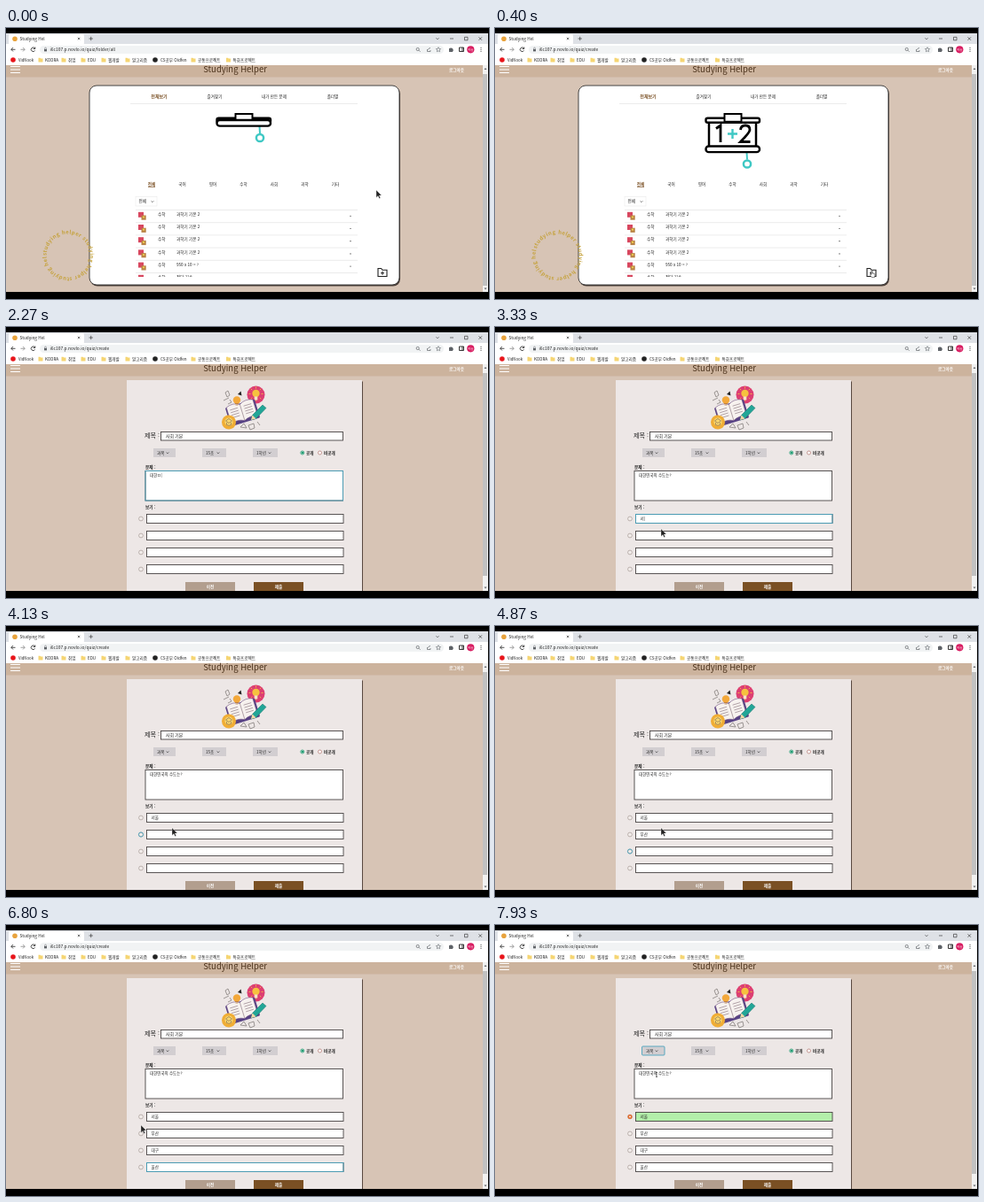
These frames come from a looping animation (544 by 306 pixels, 8000 ms). An HTML page:

```html
<!DOCTYPE html>
<html lang="ko">
<head>
<meta charset="utf-8">
<style>
html, body { margin: 0; width: 100%; height: 100%; overflow: hidden; background: #000; }
svg { display: block; width: 544px; height: 306px; font-family: "Noto Sans CJK KR", "Noto Sans CJK", "Noto Sans", sans-serif; }
</style>
</head>
<body>
<svg id="stage" viewBox="0 0 544 306"></svg>
<script>
const LOOP = 8000, PAGE_SWITCH = 470;
const INK = '#222', BROWN = '#7a5024', TEAL = '#3fc8c4', GRAY = '#5f6368';
const APP = 'Studying Helper', HOST = 'i6c107.p.novlo.io/quiz/';

const rect = (x, y, w, h, fill, extra = '') =>
  `<rect x="${x}" y="${y}" width="${w}" height="${h}" fill="${fill}" ${extra}/>`;
const circle = (x, y, r, fill, extra = '') =>
  `<circle cx="${x}" cy="${y}" r="${r}" fill="${fill}" ${extra}/>`;
const path = (d, stroke = INK, width = .8, fill = 'none', extra = '') =>
  `<path d="${d}" stroke="${stroke}" stroke-width="${width}" fill="${fill}" ${extra}/>`;
const text = (x, y, s, size = 4.6, fill = INK, extra = '') =>
  `<text x="${x}" y="${y}" font-size="${size}" fill="${fill}" ${extra}>${s}</text>`;
const MID = ' text-anchor="middle"', BOLD = ' font-weight="700"', MEDIUM = ' font-weight="500"';
const chevron = (x, y) => path(`M${x - 1.4} ${y - .7}l1.4 1.4 1.4-1.4`, INK, .6);
const field = ([x, y, w, h], extra = '') => rect(x, y, w, h, '#fff', `stroke="#484444" stroke-width=".9" ${extra}`);

function browser() {
  const folder = (x, label) =>
    path(`M${x - 2.5} 33.8h2l.8.7h2.2v4h-5z`, 'none', 0, '#f5d573') + text(x + 5, 37.7, label);
  return rect(0, 6, 543, 12, '#dee1e6') + rect(3, 7, 85, 12, '#fff', 'rx="2"') +
    circle(10, 12.3, 2.8, '#e8a33d') + text(15.5, 13.8, APP.slice(0, 12), 4.7) +
    path('M80.8 10.8l2.4 2.4m0-2.4l-2.4 2.4M93.5 12h4.4m-2.2-2.2v4.4M484.5 11.3l1.5 1.5 1.5-1.5M500 12h4M516.5 10.3h3.5v3.5h-3.5zM532.5 10.3l3.5 3.5m0-3.5l-3.5 3.5', INK, .6) +
    rect(0, 18, 543, 24, '#fff') + rect(38, 20, 455, 9, '#f1f3f4', 'rx="4.5"') +
    path('M10.5 24.3H6m2-2.2l-2.2 2.2L8 26.5M32.5 23a2.3 2.3 0 1 0 .1 2.4M32.8 21.5v2h-2', INK, .8) +
    path('M16.5 24.3H21m-2-2.2l2.2 2.2L19 26.5', '#888', .8) +
    rect(43, 24, 3, 2.4, GRAY) + path('M43.6 24v-1a.9.9 0 0 1 1.8 0v1', GRAY, .5) +
    `<text id="url" x="49.5" y="26.3" font-size="4.9" fill="${INK}"></text>` +
    circle(463.7, 24, 1.6, 'none', `stroke="${GRAY}" stroke-width=".7"`) +
    path('M465 25.2l1.6 1.6M474.5 24v2.5h3.5V25m-2.5-.5q.5-2 2.5-2', GRAY, .7) +
    path('M487 21.7l.8 1.7 1.8.2-1.3 1.3.3 1.8-1.6-.9-1.6.9.3-1.8-1.3-1.3 1.8-.2z', GRAY, .6) +
    path('M499 23h1.3a.8.8 0 0 1 1.6 0h1.3v1.3a.8.8 0 0 1 0 1.6V27H499z', 'none', 0, GRAY) +
    path('M510.5 22h5v4.5h-5zM514 22v4.5', INK, .9) +
    circle(523.3, 24.3, 4.1, '#d81b60') + text(523.3, 25.6, '하늘', 3.4, '#fff', MID) +
    [22.3, 24.3, 26.3].map(y => circle(535, y, .55, INK)).join('') +
    circle(8, 36, 2.8, '#e8151b') + text(14, 37.7, 'VidNook', 4.3) +
    folder(39, 'KODRA') + folder(65, '취업') + folder(87, 'EDU') + folder(110, '웹개발') + folder(137, '알고리즘') +
    circle(168, 36, 2.8, INK) + text(174, 37.7, 'CS공부 Oldfen') +
    folder(211, '공통프로젝트') + folder(250.5, '특화프로젝트') +
    rect(0, 42, 537, 256, '#d7c4b5') + rect(0, 42, 537, 13.5, '#ccb39d') +
    path('M5 43.5h11M5 47h11M5 50.5h11', '#fff', 1.1) +
    text(258, 50.3, APP, 9.5, '#4d341d', MID + MEDIUM) +
    text(507.5, 49, '로그아웃', 4.6, '#fff', MID + BOLD) +
    rect(537, 42, 6, 256, '#f1f1f1') + '<rect id="thumb" x="537" y="52" width="5" fill="#c1c1c1"/>' +
    path('M538.5 47l1.5-2 1.5 2z', 'none', 0, GRAY) + path('M538.5 293.5l1.5 2 1.5-2z', 'none', 0, GRAY);
}

function listPage() {
  const tabs = [[172.5, '전체보기'], [235, '즐겨찾기'], [302, '내가 만든 문제'], [368, '폴더별']];
  const subjects = ['전체', '국어', '영어', '수학', '사회', '과학', '기타'];
  const titles = ['과학기 기본 2', '과학기 기본 2', '과학기 기본 2', '과학기 기본 2', '950 x 10 = ?', '정답 지수'];
  const style = i => MID + (i ? MEDIUM : BOLD);
  const rows = titles.map((s, i) => {
    const y = 205.5 + i * 14.2;
    return path(`M146 ${y}h250`, '#ddd', .6) + rect(149, y + 2.3, 6, 6, '#d8475f') +
      rect(152.5, y + 6, 5.2, 5.2, '#b98345') + circle(155, y + 8, 1.1, '#f0d04c') +
      text(171, y + 6.4, '수학', 4.7, INK, MEDIUM) + text(192, y + 6.4, s, 4.6, INK, MEDIUM) +
      circle(388, y + 6.8, .6, INK);
  }).join('');
  return rect(95, 66.5, 349, 225, '#4d4039', 'rx="8"') +
    rect(94, 65, 349, 225, '#fff', 'rx="8" stroke="#333" stroke-width=".9"') +
    tabs.map(([x, s], i) => text(x, 78.7, s, i ? 4.6 : 5, i ? INK : BROWN, style(i))).join('') +
    path('M140 85.5h256', '#ddd', .6) +
    '<clipPath id="sheet"><rect id="sheetArea" x="236" y="105" width="63"/></clipPath>' +
    `<g clip-path="url(#sheet)">${path('M241 104v32M294 104v32', '#000', 2.5)}
      ${path('M249 113.5l5-3.5v19M276.500 115q.5-5 5.500-5t5 5q0 3-10.500 13.500h11', '#000', 2.8)}
      ${path('M262 119.5h11m-5.5-5.5v11', TEAL, 2.4)}</g>` +
    rect(237.5, 101.8, 60.5, 5, '#fff', 'rx="2" stroke="#000" stroke-width="2.4"') +
    rect(258.5, 97, 19, 8.8, '#fff', 'stroke="#000" stroke-width="2"') +
    `<g id="pull"><g id="cord">${path('M285.5 111l.5 8', TEAL, 2)}
      ${circle(286, 124, 4.1, '#fff', `stroke="${TEAL}" stroke-width="2.5"`)}</g>
      ${rect(237.5, 104, 60.5, 6.6, '#fff', 'rx="3.2" stroke="#000" stroke-width="2.4"')}</g>` +
    subjects.map((s, i) => text(164 + i * 34.5, 177.7, s, 4.6, i ? INK : BROWN, style(i))).join('') +
    path('M160 179.5h8', BROWN, .7) +
    rect(146, 190.5, 24, 10.5, '#fff', 'stroke="#e5e5e5" stroke-width=".5"') +
    text(149.5, 197.4, '전체', 4.6, INK, MEDIUM) + chevron(165, 196) +
    `<clipPath id="list"><rect x="140" y="203" width="260" height="78"/></clipPath><g clip-path="url(#list)">${rows}</g>` +
    path('M419 271.5h3.5l1.5 1.7h5v7.3h-10zM424 274.8v4m-2-2h4', INK, 1.1) +
    `<g id="ring"><path id="orbit" d="M45.500 257a24.500 24.500 0 1 1 49 0a24.500 24.500 0 1 1-49 0" fill="none"/>
      <text font-size="6" letter-spacing=".42" font-weight="700" fill="#c5a23c"><textPath href="#orbit">${(APP.toLowerCase() + ' ').repeat(3)}</textPath></text></g>`;
}

const titleBox = [174.5, 118.5, 205, 9.5, 0];
const questionBox = [157, 162.5, 222.5, 33.5, 0];
const optionY = [211.5, 230.5, 249.5, 268.5];
const inputBox = i => [158.5, optionY[i], 221.5, 10, 0];
const radioBox = i => [149.4, optionY[i] + 2.4, 5.2, 5.2, 2.6];

function illustration() {
  const rays = [0, 45, 90, 135, 180, 225, 270, 315].map(a =>
    path('M281.500 67.500v2', '#f6c23f', .8, 'none', `transform="rotate(${a} 281.5 75.5)"`)).join('');
  return circle(281.5, 76.5, 10, '#dd3f72') + rays + circle(281.5, 75, 4.2, '#f6c23f') + rect(279.7, 78.500, 3.6, 4, '#f4e3c8') +
    `<g transform="rotate(-17 266 96)">${rect(249, 86, 34.5, 22, '#574284', 'rx="1.5"')}
      ${path('M250.500 86q8-3.500 15.500 1 7.500-4.500 15.500-1v19q-8-3-15.500 1-7.500-4-15.500-1z', '#6b4a7e', .5, '#f7f2ef')}
      ${path('M266 87v18.500M253.500 90h9m-9 3h9m-9 3h9m-9 3h9M269.500 90h9m-9 3h9m-9 3h9m-9 3h9', '#8a7680', .6)}</g>` +
    path('M276 105l1.500-5.500 11.500-11.500 4 3.500-11.500 12z', '#166e69', .5, '#22a697') +
    path('M276 105l1.500-5.500 4 4z', 'none', 0, '#f3d6a5') +
    circle(251, 107.5, 8, '#f0ad35') + circle(251, 107, 4.6, '#f8d76e') +
    path('M247.500 106l3.500-2.500 3.500 2.500-3.500 2.500zM248.500 108v2.500q2.500 1.500 5 0V108', '#8a6d52', .7) +
    circle(260, 82.5, 4.2, '#f3a83a') + path('M258 86.500h4m-3.500 1.500h3', '#b7702b', .7) +
    path('M261 76l3.500-3.500 1 5z', 'none', 0, INK) +
    path('M247 74l3-2 2 5-3 2zM245 83l6-3M252 82l2 3-4 2M264 113l4-4 3 5zM273 111l6-2 1 5-5 2zM283 107l3 4', '#77716f', .7);
}

function formPage() {
  const select = (x, w, s) => rect(x, 137, w, 10, '#d2ced1') + text(x + 4, 143.7, s, 4.5, INK, MEDIUM) + chevron(x + w - 9, 142.2);
  const button = (x, fill, s) => rect(x, 288, 56, 10, fill) + text(x + 28, 294.6, s, 4.6, '#fff', MID + BOLD);
  const option = (y, i) => circle(152, y + 5, 2.4, '#f1ecea', 'stroke="#9a8e89" stroke-width=".6"') +
    field(inputBox(i), `id="option${i}"`);
  return rect(138, 61.5, 264, 236.5, '#59483f') + rect(136, 60, 265, 238, '#ede7e6') + illustration() +
    text(156, 125.2, '제목 :', 7.1, INK, MEDIUM) + field(titleBox) +
    select(166, 25, '과목') + select(221, 27, '15초') + select(278, 28, '1학년') +
    circle(333.8, 142, 2, '#fff', 'stroke="#16966b" stroke-width=".8"') + circle(333.8, 142, 1.2, '#16966b') +
    text(338, 143.7, '공개', 4.6, INK, BOLD) +
    circle(353.5, 142, 2, '#fff', 'stroke="#a55d55" stroke-width=".6"') + text(358, 143.7, '비공개', 4.6, INK, BOLD) +
    text(157, 160.2, '문제 :', 4.7, INK, BOLD) + field(questionBox) +
    text(157, 205.2, '보기 :', 4.6, INK, BOLD) + optionY.map(option).join('') +
    `<g id="picked">${circle(152, 216.4, 2.5, '#e36b2c')}${circle(152, 216.4, .9, '#fff')}</g>` +
    button(202, '#b29e8e', '이전') + button(279, BROWN, '제출') +
    '<rect id="focus" fill="none" stroke="#4aa3bd" stroke-width=".9"/>' +
    entries.map((e, i) => text(e.x, e.y, '', e.size, INK, `id="entry${i}"` + MEDIUM)).join('');
}

// Each Hangul syllable appears jamo by jamo, as an input method composes it.
function compose(s) {
  const initials = 'ㄱㄲㄴㄷㄸㄹㅁㅂㅃㅅㅆㅇㅈㅉㅊㅋㅌㅍㅎ', stages = [];
  let done = '';
  for (const c of s) {
    const n = c.charCodeAt(0) - 0xAC00;
    if (n >= 0) {
      stages.push(done + initials[Math.floor(n / 588)]);
      if (n % 28) stages.push(done + String.fromCharCode(0xAC00 + n - n % 28));
    }
    stages.push(done += c);
  }
  return stages;
}

const entry = (x, y, size, s, start, end) => ({ x, y, size, start, end, stages: compose(s) });
const entries = [
  entry(180, 124.9, 4.9, '사회 기본', 1270, 1950),
  entry(162, 169.4, 4.5, '대한민국의 수도는?', 2070, 2850),
  ...[['서울', 3130, 3900], ['부산', 4230, 4720], ['대구', 5130, 5600], ['울산', 5930, 6500]]
    .map(([s, start, end], i) => entry(163.5, optionY[i] + 6.7, 4.6, s, start, end))
];

const focusSteps = [
  [0, null], [1130, titleBox], [2000, questionBox], [2850, inputBox(0)],
  [4000, radioBox(1)], [4150, inputBox(1)], [4800, radioBox(2)], [5000, inputBox(2)],
  [5650, radioBox(3)], [5800, inputBox(3)], [7070, null], [7670, [165.5, 137, 25.5, 10, 1]]
];
const moves = [
  [0, 417, 183], [70, 417, 183], [330, 424, 274], [520, 424, 274], [960, 250, 123], [2300, 205, 180],
  [2600, 190, 185], [2870, 187, 228], [6500, 187, 228], [6800, 152, 226], [6930, 152, 226], [7050, 152, 215],
  [7250, 152, 215], [7600, 176, 142], [7700, 176, 142], [7900, 182, 169]
];
const shapes = [[0, 'arrow'], [300, 'hand'], [520, 'arrow'], [950, 'hidden'], [2650, 'arrow'], [7780, 'beam']];

const $ = id => document.getElementById(id);
const set = (id, attrs) => { for (const k in attrs) $(id).setAttribute(k, attrs[k]); };
const show = (id, on) => set(id, { display: on ? 'inline' : 'none' });
const clamp = v => Math.max(0, Math.min(1, v));
const ease = v => { v = clamp(v); return v * v * (3 - 2 * v); };
const current = (steps, t) => steps.filter(s => s[0] <= t).pop()[1];

function pointerAt(t) {
  const i = moves.findIndex(m => m[0] > t);
  if (i < 0) return moves[moves.length - 1].slice(1);
  const [a, b] = [moves[i - 1], moves[i]], k = ease((t - a[0]) / (b[0] - a[0]));
  return [a[1] + (b[1] - a[1]) * k, a[2] + (b[2] - a[2]) * k];
}

$('stage').innerHTML = browser() + `<g id="list-page">${listPage()}</g><g id="form-page">${formPage()}</g>` +
  `<g id="pointer">${path('M0 0v8.400l2-1.800 1.400 3 1.300-.6-1.400-2.900h2.700z', '#fff', .3, INK, 'id="arrow"')}
    ${path('M0 0v4.500l-1-.6q-1 .3-.4 1.200l1.600 2.400h3.300l.7-3.600-2.900-.8V0Q.7-.8 0 0z', INK, .5, '#fff', 'id="hand"')}
    ${path('M-1-2.500h2M0-2.500v5M-1 2.500h2', INK, .6, 'none', 'id="beam"')}</g>` +
  rect(0, 298, 544, 8, '#000');

function draw(t) {
  const onForm = t >= PAGE_SWITCH;
  show('list-page', !onForm);
  show('form-page', onForm);
  set('thumb', { height: onForm ? 229 : 239 });
  $('url').textContent = HOST + (t < 380 ? 'folder/all' : 'create');

  const open = ease(t / 380), drop = 29.5 * open;
  set('pull', { transform: `translate(0 ${drop})` });
  set('cord', { transform: `translate(${-2 * open} 0)` });
  set('sheetArea', { height: drop + 1 });
  set('ring', { transform: `rotate(${t * .045} 70 257)` });

  entries.forEach((e, i) => {
    const n = e.stages.length, k = Math.floor((t - e.start) / (e.end - e.start) * (n - 1));
    const caret = t >= e.start && t < e.end ? '|' : '';
    $('entry' + i).textContent = k < 0 ? '' : e.stages[Math.min(k, n - 1)] + caret;
  });

  const box = current(focusSteps, t);
  show('focus', box);
  if (box) {
    const [x, y, width, height, rx] = box;
    set('focus', { x, y, width, height, rx });
  }
  const picked = t >= 7070;
  set('option0', { fill: picked ? '#b3efaa' : '#fff' });
  show('picked', picked);

  const shape = current(shapes, t);
  for (const id of ['arrow', 'hand', 'beam']) show(id, id === shape);
  set('pointer', { transform: `translate(${pointerAt(t).join(' ')})` });
}

function tick() {
  draw(performance.now() % LOOP);
  requestAnimationFrame(tick);
}
tick();
</script>
</body>
</html>
```
